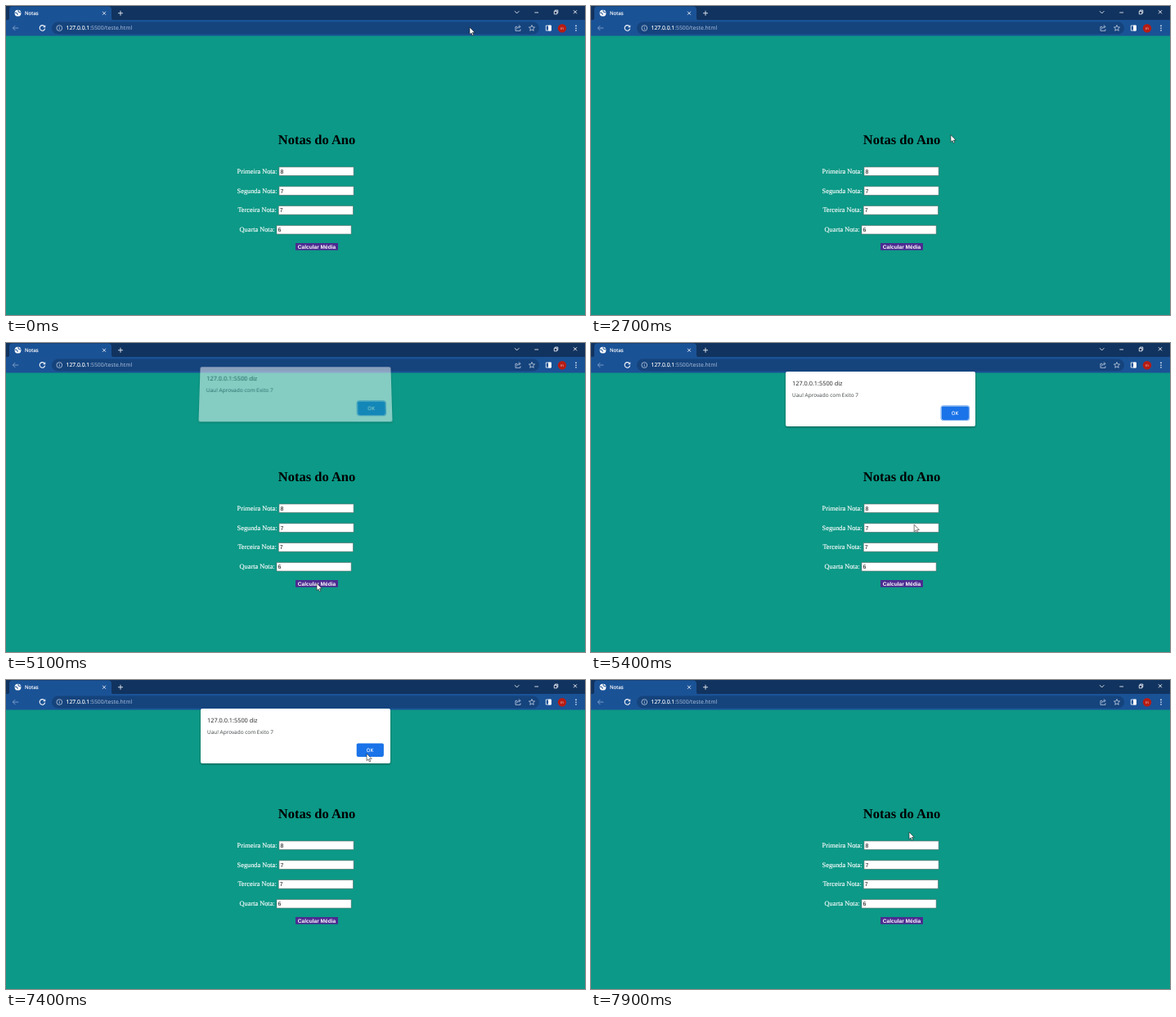
An HTML page that plays this animation: 708 by 378 pixels, repeating every 8000 ms.

```html
<!DOCTYPE html>
<html lang="pt">
<head>
<meta charset="utf-8">
<title>Notas</title>
<style>
  html, body { margin: 0; width: 100%; height: 100%; overflow: hidden; background: #0c9987; }
  svg { position: absolute; left: 0; top: 0; overflow: visible; text-rendering: geometricPrecision; }
  .ui { font-family: "Open Sans", "Noto Sans", sans-serif; }
  .page { font-family: "Liberation Serif", "Times New Roman", serif; }
  .form { font-family: "Liberation Sans", Arial, sans-serif; }
  .light { fill: #fff; stroke: #fff; stroke-width: .15; }
  .line { fill: none; stroke: #fff; stroke-width: .8; }
  .middle { text-anchor: middle; }
  #dialog { left: 238px; top: 35px; filter: drop-shadow(0 1px 1.2px rgba(0, 0, 0, .4)); }
</style>
</head>
<body>
<svg width="708" height="378" viewBox="0 0 708 378">
  <g class="ui">
    <rect width="708" height="18" fill="#11335f"/>
    <rect y="17" width="708" height="19.5" fill="#1a5296"/>
    <path d="M1 17.5q3 0 3-3V4.500q0-4 4-4H125q4 0 4 4V14.500q0 3 3 3z" fill="#1a5296"/>
    <rect x="56" y="19.5" width="596" height="15" rx="7.5" fill="#15437c"/>

    <circle cx="14.5" cy="8.7" r="3.9" fill="#fff"/>
    <path d="M11 8l3 1v2M15 5v2l3 1" fill="none" stroke="#1a5296"/>
    <text class="light" x="23" y="11" font-size="6.1">Notas</text>
    <text x="73.5" y="29.4" font-size="6.8" fill="#b2c5df"><tspan class="light">127.0.0.1</tspan>:5500/teste.html</text>
    <g id="icons" class="line"></g>

    <circle cx="680" cy="27.2" r="5.2" fill="#b71c14"/>
    <text class="middle" x="680" y="28.7" font-size="4.6" fill="#f2d2ce">m</text>
  </g>

  <text class="page middle" x="380" y="168.8" font-size="16.55" font-weight="700">Notas do Ano</text>
  <g id="rows"></g>
  <g id="focus" fill="none">
    <rect x="333.2" y="196" width="93" height="12.4" rx="1.5" stroke="#fff"/>
    <rect x="334.1" y="197" width="91.2" height="10.4" rx="1" stroke="#111"/>
  </g>
  <g id="spinner">
    <rect x="417" y="198.5" width="5.5" height="7.5" fill="#eee"/>
    <path d="M418 201.800l1.800-2.200 1.800 2.200zM418 203l1.800 2.200 1.800-2.200z" fill="#333"/>
  </g>
  <path id="caret" d="M340.700 198.800v6.800" stroke="#000" stroke-width=".6"/>
  <rect x="354" y="290" width="52" height="8.7" fill="#4c2b91"/>
  <text class="form middle" x="380" y="296.7" font-size="6.6" font-weight="700" fill="#fff">Calcular Média</text>
</svg>

<svg id="dialog" class="ui" width="232" height="67">
  <rect width="232" height="67" rx="2" fill="#fff"/>
  <text x="8" y="16.7" font-size="7.35" fill="#202124">127.0.0.1:5500 diz</text>
  <text x="8" y="31.4" font-size="6.45" fill="#3c4043">Uau! Aprovado com Exito 7</text>
  <rect id="ring" x="190" y="41.8" width="34.6" height="17.8" rx="2.4" fill="#fff" stroke="#6fa5ef"/>
  <rect x="190.7" y="42.5" width="33.2" height="16.4" rx="1.8" fill="#1a73e8"/>
  <text class="light middle" x="207" y="52.7" font-size="6">OK</text>
</svg>

<svg width="708" height="378">
  <g id="cursor">
    <path id="arrow" d="M0 0V8.700l2-1.800 1.400 3.100 1.400-.6-1.400-3h2.800z" fill="#fff" stroke="#111" stroke-width=".55"/>
    <path id="beam" d="M-1.500-4.500h3m-1.500 0v9m-1.500 0h3" fill="none" stroke="#222" stroke-width=".6"/>
  </g>
</svg>

<script>
const LOOP = 8000, STEP = 100;
const $ = id => document.getElementById(id);
const clamp = v => Math.max(0, Math.min(1, v));
const ease = k => k * k * (3 - 2 * k);
const show = (id, on) => { $(id).style.display = on ? '' : 'none'; };

// Browser icons, each drawn around its own centre
const icon = (x, y, d, extra = '') =>
  `<path transform="translate(${x} ${y})" d="${d}" ${extra}/>`;
const cross = 'M-2-2l4 4m0-4l-4 4';
const arrowLeft = 'M3.500 0h-7m3-3l-3 3 3 3';
const dim = 'stroke="#8eabd2"', soft = 'stroke="#c3d1e5"';
const star = 'M' + Array.from({ length: 10 }, (_, i) => {
  const r = i % 2 ? 1.7 : 3.8, a = i * Math.PI / 5;
  return `${r * Math.sin(a)} ${-r * Math.cos(a)}`;
}).join('L') + 'z';
$('icons').innerHTML =
  icon(120, 8.8, cross) +
  icon(140, 8.8, 'M0-3v6M-3 0h6') +
  icon(624.7, 7.6, 'M-2.700-1.400L0 1.400l2.700-2.800') +
  icon(648.7, 8, 'M-2.400 0h4.800') +
  icon(672.3, 7.4, 'M-2-1h3.500v3.500H-2zM-1-1v-1.300h3.500v3.500h-1') +
  icon(696, 7.3, cross, 'stroke-width=".9"') +
  icon(11.8, 27, arrowLeft, dim) +
  icon(28, 27, arrowLeft, dim + ' style="rotate: 180deg"') +
  icon(44.5, 27, 'M2.700-2A3.300 3.300 0 1 0 3.200.7', 'stroke-width="1.1"') +
  icon(46.7, 24.7, 'M1.500-1.500v3h-3z', 'fill="#fff" stroke="none"') +
  icon(65.3, 27, 'M-3.400 0a3.400 3.400 0 1 0 6.800 0a3.400 3.400 0 1 0-6.800 0M0-.5v2.300M0-2v.8', soft) +
  icon(626, 27.3, 'M-1-2h-2v5h6V1M-1.500 1q0-3 4-3M1-4l2 2-2 2', soft) +
  icon(643, 27.2, star, soft) +
  icon(663.3, 27, 'M-3-3h6v6h-6z') +
  icon(665, 27, 'M-1.500-3h3v6h-3z', 'fill="#fff"') +
  [-1, 0, 1].map(i => icon(697, 27.1 + i * 2.8, 'M0-.7v1.400', 'stroke-width="1.4"')).join('');

// Form rows: label and field together are centred on the page
const FIELD = { width: 91.7, height: 11, gap: 2.07 };
const grades = { Primeira: 8, Segunda: 7, Terceira: 7, Quarta: 6 };
const fields = Object.entries(grades).map(([name, grade], i) => {
  const y = 202.2 + i * 23.87;
  const row = document.createElementNS('http://www.w3.org/2000/svg', 'g');
  $('rows').append(row);
  row.innerHTML = `<text class="page light" y="${y + 2.5}" font-size="8.29">${name} Nota:</text>`;
  const label = row.firstChild;
  const width = label.getComputedTextLength() + FIELD.gap;
  const start = 354 - (width + FIELD.width) / 2, left = start + width;
  label.setAttribute('x', start);
  row.innerHTML += `
    <rect x="${left + .3}" y="${y - FIELD.height / 2 + .3}" width="${FIELD.width - .6}"
      height="${FIELD.height - .6}" fill="#fff" stroke="#66716f" stroke-width=".6"/>
    <text class="form" x="${left + 1.9}" y="${y + 2.5}" font-size="6.9">${grade}</text>`;
  return { left, y };
});

// Pointer moves: start, end, destination
const home = [567, 26];
const moves = [
  [0, 800, 592, 28],
  [1000, 1500, 606, 118],
  [1500, 1900, 656, 130],
  [2000, 2400, 530, 78],
  [2400, 2900, 391, 201],
  [3500, 4000, 379.7, 305],
  [4100, 4500, 380, 294],
  [5200, 5700, 423, 90],
  [6200, 6700, 441, 90],
  [7700, 7900, 389, 186],
];
const pointerAt = t => moves.reduce(([px, py], [from, to, x, y]) => {
  const k = ease(clamp((t - from) / (to - from)));
  return [px + (x - px) * k, py + (y - py) * k];
}, home);

const FOCUS = 3400, CLICK = 4900, OPEN = 5000, PRESS = 7300, CLOSED = 7600, FADE = 200;

function draw(t) {
  const [x, y] = pointerAt(t);
  const overField = t < CLICK && fields.some(f =>
    x > f.left && x < f.left + FIELD.width && Math.abs(y - f.y) < FIELD.height / 2);
  $('cursor').setAttribute('transform', `translate(${x} ${y})`);
  show('arrow', !overField);
  show('beam', overField);

  const focused = t >= FOCUS && t < CLICK;
  show('focus', focused);
  show('spinner', focused || overField && y < 210);
  show('caret', focused && (t - FOCUS) % 1000 < 500);

  const shown = clamp(Math.min(t - OPEN, CLOSED - t) / FADE), hidden = 1 - shown;
  const dialog = $('dialog').style;
  dialog.opacity = shown;
  dialog.transform = hidden
    ? `translateY(${-12 * hidden}px) perspective(600px) rotateX(${18 * hidden}deg) scale(${1 + .025 * hidden})`
    : 'none';
  show('ring', t < PRESS);
}

const start = performance.now();
function tick() {
  const t = (performance.now() - start) % LOOP;
  draw(Math.floor(t / STEP) * STEP);
  requestAnimationFrame(tick);
}
tick();
</script>
</body>
</html>
```
